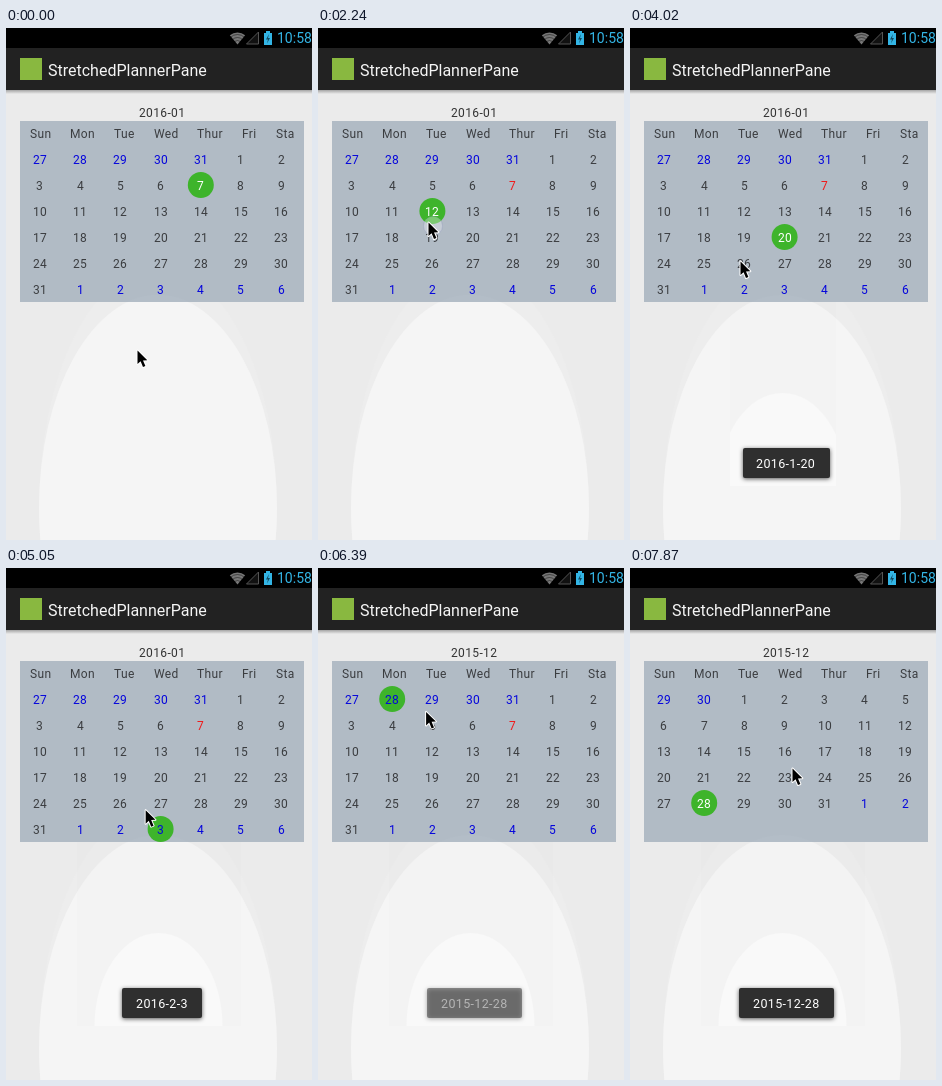
Recreate the animation shown at these times as an HTML page with a canvas. Size 306 by 512 pixels, loop 8000 ms.

```html
<!DOCTYPE html>
<html lang="en">
<head>
<meta charset="utf-8">
<title>Calendar</title>
<style>
html, body { margin: 0; width: 100%; height: 100%; overflow: hidden; background: #ebebeb; }
canvas { display: block; width: 306px; height: 512px; }
</style>
</head>
<body>
<canvas id="stage"></canvas>
<script>
const W = 306, H = 512, LOOP = 8000;
const TICK = 148.3; // the screen updates in even steps; all times below count ticks
const canvas = document.getElementById('stage');
const ctx = canvas.getContext('2d');
const ratio = window.devicePixelRatio || 1;
canvas.width = W * ratio;
canvas.height = H * ratio;

const GREEN = '#3eb42b', INK = '#3b3d40', BLUE = '#0505dc';
const CAL = { x: 14, y: 93, w: 284, h: 181 };
const WEEKDAYS = ['Sun', 'Mon', 'Tue', 'Wed', 'Thur', 'Fri', 'Sta'];
const date = (y, m, d) => new Date(y, m - 1, d);
const TODAY = date(2016, 1, 7), OPEN_MONTH = date(2016, 1, 1);

const TAPS = [
  { at: 15, day: date(2016, 1, 12) },
  { at: 21, day: date(2016, 1, 20) },
  { at: 31, day: date(2016, 2, 3) },
  { at: 42, day: date(2015, 12, 28) },
];
const MOVES = [
  { from: 2, to: 5, x: 113, y: 222 },
  { from: 6, to: 13, x: 110, y: 194 },
  { from: 15, to: 19, x: 167, y: 209 },
  { from: 22, to: 27, x: 110, y: 233 },
  { from: 28, to: 31, x: 152, y: 264 },
  { from: 33, to: 39, x: 75, y: 130 },
  { from: 42, to: 47, x: 238, y: 197 },
  { from: 49, to: 53, x: 162, y: 200 },
];
const SWIPE = { from: 45.075, to: 49.075 };

const progress = (t, { from, to }) => Math.min(1, Math.max(0, (t - from) / (to - from)));
const smooth = u => u * u * (3 - 2 * u);
const sameDay = (a, b) => a.getTime() === b.getTime();

function rect(x, y, w, h, fill) {
  ctx.fillStyle = fill;
  ctx.fillRect(x, y, w, h);
}

function disc(x, y, rx, ry, fill) {
  ctx.fillStyle = fill;
  ctx.beginPath();
  ctx.ellipse(x, y, rx, ry, 0, 0, Math.PI * 2);
  ctx.fill();
}

function shape(points, fill) {
  ctx.fillStyle = fill;
  ctx.beginPath();
  points.forEach(([x, y]) => ctx.lineTo(x, y));
  ctx.closePath();
  ctx.fill();
}

function outline(color, width = 1) {
  ctx.strokeStyle = color;
  ctx.lineWidth = width;
  ctx.stroke();
}

function measure(str, size, spacing = 0.35) {
  ctx.font = `${size}px Roboto, sans-serif`;
  ctx.letterSpacing = spacing + 'px';
  return ctx.measureText(str).width;
}

function text(str, x, y, size, color, spacing) {
  measure(str, size, spacing);
  ctx.fillStyle = color;
  ctx.fillText(str, Math.round(x), Math.round(y + size * 0.355));
}

function centered(str, x, y, size, color) {
  text(str, x - measure(str, size) / 2, y, size, color);
}

function clipped(x, y, w, h, paint) {
  ctx.save();
  ctx.beginPath();
  ctx.rect(x, y, w, h);
  ctx.clip();
  paint();
  ctx.restore();
}

function background(t) {
  rect(0, 0, W, H, '#ebebeb');
  disc(152, 480, 119, 241, '#ededed');
  disc(152, 480, 119, 213, '#f5f5f5');
  if (t <= TAPS[0].at) return;
  const half = t < 34 ? 53 : 82;
  clipped(153 - half, 144, half * 2, 314, () => {
    rect(0, 0, W, H, 'rgba(0,0,0,.006)');
    disc(152.5, 458, 64, 93, '#f9f9f9');
  });
}

function statusBar() {
  rect(0, 0, W, 20, '#000');
  ctx.fillStyle = '#777';
  ctx.beginPath();
  ctx.moveTo(231.5, 16.5);
  ctx.arc(231.5, 16.5, 12, -Math.PI * 0.72, -Math.PI * 0.28);
  ctx.fill();
  for (const r of [4, 7, 10]) {
    ctx.beginPath();
    ctx.arc(231.5, 16.5, r, -Math.PI, 0);
    outline('rgba(0,0,0,.55)', 0.8);
  }
  shape([[240.5, 16], [252.5, 16], [252.5, 4]], '#111');
  outline('#555');
  rect(260, 3, 4, 2, '#33b5e5');
  rect(258, 5, 8, 12, '#33b5e5');
  shape([[263, 6], [260, 11.5], [262, 11.5], [261, 15.5], [264, 10], [262, 10]], '#134a60');
  text('10:58', 271, 10, 14, '#33b5e5', 0);
}

function actionBar() {
  const glow = ctx.createLinearGradient(0, 62, 0, 66);
  glow.addColorStop(0, 'rgba(0,0,0,.3)');
  glow.addColorStop(1, 'rgba(0,0,0,0)');
  rect(0, 62, W, 4, glow);
  rect(0, 20, W, 42, '#222');
  rect(14, 30, 22, 22, '#89b840');
  text('StretchedPlannerPane', 42, 42.5, 16, '#f5f5f5', 0);
}

// Weekday names share the spare width evenly.
function weekdayRow(left) {
  const widths = WEEKDAYS.map(name => measure(name, 12));
  const gap = (CAL.w - widths.reduce((a, b) => a + b)) / WEEKDAYS.length;
  let x = left + gap / 2;
  WEEKDAYS.forEach((name, i) => {
    text(name, x, 106, 12, INK);
    x += widths[i] + gap;
  });
}

function monthPage(year, month, left, selected) {
  weekdayRow(left);
  const lead = date(year, month, 1).getDay();
  const rows = Math.ceil((lead + date(year, month + 1, 0).getDate()) / 7);
  for (let i = 0; i < rows * 7; i++) {
    const day = date(year, month, i - lead + 1);
    const x = left + 20 + (i % 7) * 40.2, y = 131 + Math.floor(i / 7) * 26;
    const chosen = sameDay(day, selected);
    if (chosen) disc(x, y, 13, 13, GREEN);
    const color = day.getMonth() + 1 !== month ? BLUE
      : chosen ? '#fff' : sameDay(day, TODAY) ? '#f01818' : INK;
    centered(String(day.getDate()), x, y + 0.5, 12, color);
  }
}

function calendar(t, selected) {
  const shift = CAL.w * smooth(progress(t, SWIPE));
  centered(selected < OPEN_MONTH ? '2015-12' : '2016-01', 156.5, 85, 12, '#333');
  rect(CAL.x, CAL.y, CAL.w, CAL.h, 'rgba(160,172,186,.76)');
  clipped(CAL.x, CAL.y, CAL.w, CAL.h, () => {
    if (shift < CAL.w) monthPage(2016, 1, CAL.x + shift, selected);
    if (shift > 0) monthPage(2015, 12, CAL.x + shift - CAL.w, selected);
  });
}

function toast(t, tap) {
  const label = [tap.day.getFullYear(), tap.day.getMonth() + 1, tap.day.getDate()].join('-');
  const w = Math.round(measure(label, 12.5)) + 28;
  ctx.save();
  ctx.globalAlpha = Math.min(1, (t - tap.at) / 2);
  ctx.save();
  ctx.shadowColor = 'rgba(0,0,0,.65)';
  ctx.shadowBlur = 4 * ratio;
  ctx.shadowOffsetY = ratio;
  ctx.fillStyle = '#2f2f2f';
  ctx.beginPath();
  ctx.roundRect(Math.round(156 - w / 2), 420, w, 30, 2);
  ctx.fill();
  ctx.restore();
  centered(label, 156, 435.5, 12.5, '#fff');
  ctx.restore();
}

function touch(x, y, alpha) {
  disc(x, y, 9.5, 9.5, `rgba(238,240,246,${alpha})`);
  outline(`rgba(140,150,185,${alpha})`);
}

function pointer(t, tap) {
  let x = 131, y = 322;
  for (const move of MOVES) {
    const u = progress(t, move);
    x += (move.x - x) * u;
    y += (move.y - y) * u;
  }
  if (tap && tap.at === t) touch(x + 5, y + 4, 0.35);
  if (t >= SWIPE.from && t < SWIPE.to) touch(x - 12, y + 2, 0.85);
  ctx.save();
  ctx.translate(x, y);
  ctx.lineJoin = 'round';
  shape([[0.5, 0.5], [0.5, 14], [3.6, 11.2], [6, 17], [8.4, 16], [6, 10.4], [10.3, 10.2]], '#000');
  outline('#fff', 2);
  ctx.fill();
  ctx.restore();
}

function draw(elapsed) {
  const t = Math.floor((elapsed % LOOP) / TICK);
  const tap = TAPS.filter(({ at }) => at <= t).pop();
  ctx.setTransform(ratio, 0, 0, ratio, 0, 0);
  background(t);
  statusBar();
  actionBar();
  calendar(t, tap ? tap.day : TODAY);
  if (tap) toast(t, tap);
  pointer(t, tap);
}

let start;
function loop(now) {
  start ??= now;
  draw(Math.max(0, now - start));
  requestAnimationFrame(loop);
}
requestAnimationFrame(loop);
</script>
</body>
</html>
```
